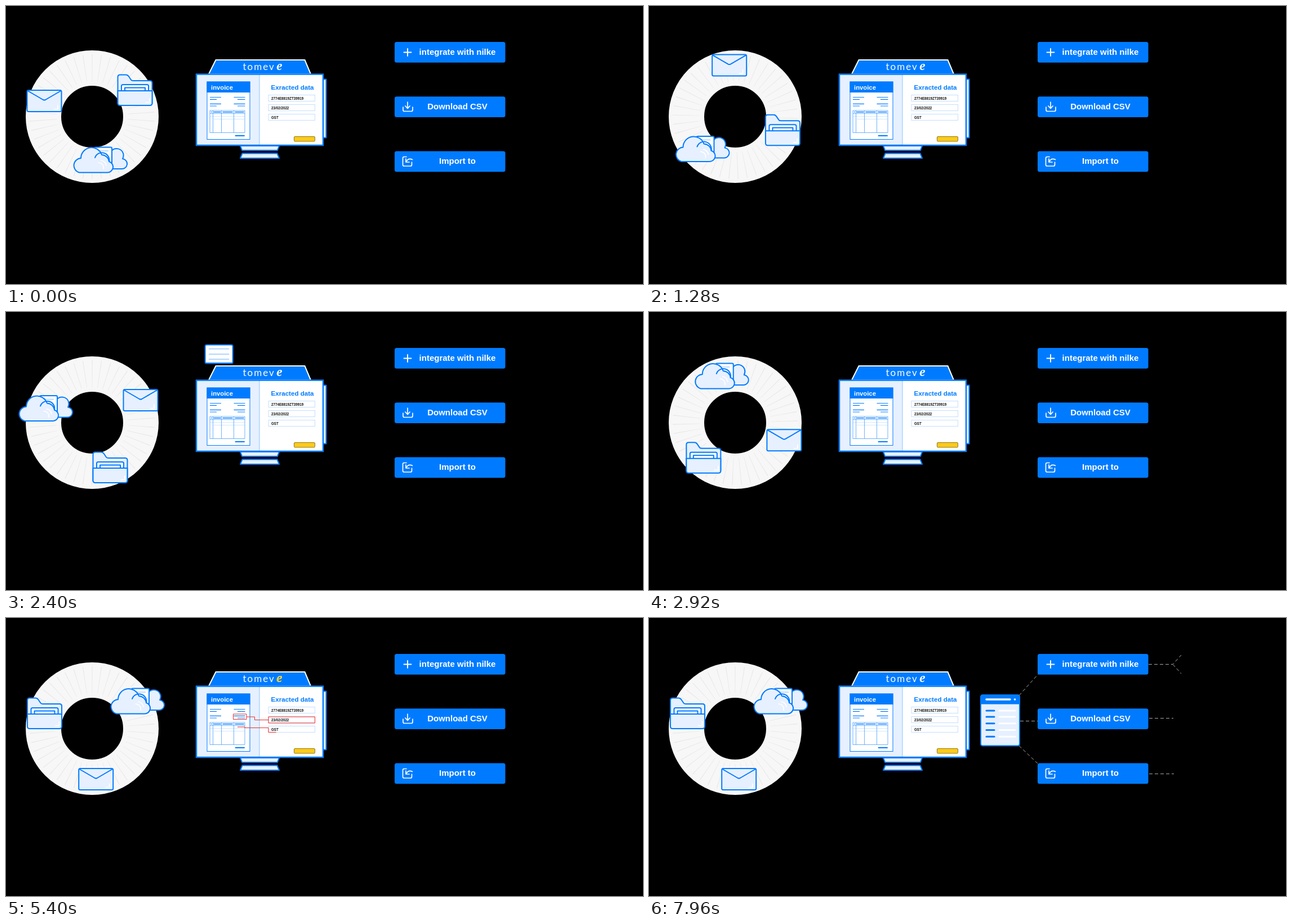
Write an HTML page that moves like this. It is 1131 px wide and 495 px high and loops after 8 s.

```html
<!DOCTYPE html>
<html lang="en">
<head>
<meta charset="utf-8">
<title>Invoice flow</title>
<style>
html, body { margin: 0; width: 100%; height: 100%; overflow: hidden; background: #000; }
svg { display: block; width: 1131px; height: 495px; }
text { font-family: "Liberation Sans", Arial, sans-serif; font-weight: 700; }
.b { stroke: #007bff; stroke-width: 2; stroke-linejoin: round; stroke-linecap: round; }
.pale { fill: #e6f0ff; }
.white { fill: #fff; }
.blue { fill: #007bff; }
.none { fill: none; }
.soft { stroke: #a6d0ff; fill: none; }
.w { stroke: #fff; fill: none; stroke-width: 1.7; stroke-linecap: round; stroke-linejoin: round; }
.label { fill: #fff; font-size: 15px; text-anchor: middle; }
.val { font-size: 6.28px; fill: #111; }
.dash { stroke: #a8a8a8; fill: none; stroke-dasharray: 6 4; }
.trace { stroke: #ee2b2b; fill: none; }
.mark { font: italic 700 19px "Noto Serif", serif; }
</style>
</head>
<body>
<svg viewBox="0 0 1131 495">
  <defs>
    <clipPath id="clipA"><rect id="wipeA" x="650" y="90" width="0" height="180"/></clipPath>
    <clipPath id="clipB"><rect id="wipeB" x="886" y="50" width="0" height="240"/></clipPath>
  </defs>

  <g id="card">
    <rect class="b white" x="-24.5" y="-16.5" width="49" height="33" rx="2.5"/>
    <path class="b" d="M-23 16H23"/>
    <path class="soft" stroke-width="1.6" d="M-18-9.5H18M-18 0H18M-18 9H18"/>
  </g>

  <circle cx="153" cy="197" r="86.5" fill="none" stroke="#f7f7f7" stroke-width="63"/>
  <circle id="ticks" cx="153" cy="197" r="87" fill="none" stroke="#e7e7e7" stroke-width="48" pathLength="420" stroke-dasharray=".7 9.3"/>

  <g id="cloud">
    <path class="b pale" d="M20 16H39A9 9 0 0 0 41-2A12 12 0 0 0 20-14Z"/>
    <rect class="b white" x="-9" y="-22.5" width="31" height="38" rx="2"/>
    <path class="soft" stroke-width="1.5" d="M-2-16H16"/>
    <path class="b pale" d="M-36 22.5A13 13 0 0 1-33-3A19 19 0 0 1 4-9A13.5 13.5 0 0 1 17 3A10 10 0 0 1 13 22.5Z"/>
    <path class="b none" d="M-8-4A13 13 0 0 1 17 3"/>
    <path class="w" d="M-2 5A9 9 0 0 1 7 16M3 1A11 11 0 0 1 12 10"/>
  </g>
  <g id="folder">
    <path class="b pale" d="M-30.5 24V-23Q-30.5-27-26.5-27H-16Q-13-27-11-24L-7-18Q-6-16.5-3-16.5H26.5Q30.5-16.5 30.5-12.5V24Z"/>
    <path class="b white" d="M-24 1V-7Q-24-9.5-21.5-9.5H21.5Q24-9.5 24-7V1"/>
    <path class="b none" stroke-width="1.5" d="M-18 1V-4H18V1"/>
    <path class="b pale" d="M-30.5 1.5H30.5V23.5Q30.5 27.5 26.5 27.5H-26.5Q-30.5 27.5-30.5 23.5Z"/>
    <path class="w" d="M26 15V22H19"/>
  </g>
  <g id="mail">
    <rect class="b pale" x="-30.5" y="-19" width="61" height="38" rx="2.5"/>
    <path class="b none" d="M-29.5-18L-2-2Q0-1 2-2L29.5-18"/>
    <path class="w" d="M24 8V14.5H17.5"/>
  </g>

  <g id="sheet">
    <rect class="b pale" stroke-width="2.5" x="1" y="137" width="69" height="90.5" rx="3.5"/>
    <path class="blue" d="M1 153.500V141Q1 137 5 137H66Q70 137 70 141V153.500Z"/>
    <path class="w" style="stroke-width:3.500px" d="M11 145H53"/>
    <circle class="white" cx="61.500" cy="145" r="1.800"/>
    <g id="rows"></g>
  </g>

  <rect class="b pale" x="555" y="130.500" width="13.500" height="104" />
  <path class="b pale" d="M416 249H485L482 257H419Z"/>
  <path class="b pale" d="M419.500 262.500H481.500L485 271H416Z"/>
  <path class="blue" stroke="#fff" stroke-width="2" d="M372.500 96H530.500L541 121H360Z"/>
  <rect class="white" x="338" y="121.500" width="225" height="126.500"/>
  <rect class="pale" x="338" y="121.500" width="112" height="126.500"/>
  <path stroke="#8fc4ff" d="M450 122V248"/>
  <rect class="b none" style="stroke-width:2.500px;stroke-linejoin:miter" x="338" y="121.500" width="225" height="126.500"/>
  <text x="420.500" y="114" fill="#fff" style="font:400 17px Lato,sans-serif;letter-spacing:2px">tomev</text>
  <text class="mark" x="480" y="114" fill="#fff">e</text>
  <text class="mark" id="glow" x="480" y="114" fill="#ffcf1a">e</text>

  <rect class="white" x="357" y="135" width="76" height="102.500" stroke="#007bff"/>
  <rect class="blue" x="356.500" y="134.500" width="77" height="19.500"/>
  <text x="364" y="149" fill="#fff" font-size="11.300">invoice</text>
  <path stroke="#007bff" stroke-width="1.200" d="M362 162.500H382M362 166.300H374M404.500 162.500H424.500M411 166.300H424.500M362 174.300H382M362 178H374M404.500 174.300H424.500M411 178H424.500"/>
  <path class="soft" stroke-width=".7" opacity=".7" d="M362 196.500H424M369 201.500H423"/>
  <path stroke="#4aa0ff" stroke-width=".8" fill="none" d="M362 186H424V225.500H362ZM362 191.500H424M367.500 186V225.500M382.500 186V225.500M404.500 186V225.500"/>
  <path class="b" style="stroke-width:1.500px" d="M364.500 188.800H365M369 188.800H381M385 188.800H402M407 188.800H422"/>
  <path class="b" d="M407.500 231H423"/>

  <text class="blue" x="470.500" y="149" font-size="11.600">Exracted data</text>
  <g id="fields"></g>
  <rect x="511.500" y="232.500" width="37" height="8.500" rx="1.500" fill="#ffcb12" stroke="#8a7430"/>
  <g id="traces"></g>

  <path class="dash" clip-path="url(#clipA)" d="M657 138L691 100M659 183.500H690M657 227.500L690 259"/>
  <path class="dash" clip-path="url(#clipB)" d="M887 82.500H930L945 66M930 82.500L945 99M888 178.500H931M888 277.500H932"/>

  <g id="buttons"></g>
  <path class="w" style="stroke-width:2px" d="M706.500 82.500H719.500M713 76V89"/>
  <path class="w" d="M713 171V182M709 178L713 182.500L717 178M705 180V185Q705 187.500 707.500 187.500H719.500Q722 187.500 722 185V180"/>
  <path class="w" d="M711 268.500H707Q704.500 268.500 704.500 271V282.500Q704.500 285 707 285H718Q720.500 285 720.500 282.500V278M710 272V278H716M710.500 277.500Q714 270 721.500 273.500"/>
  <g id="labels"></g>
</svg>
<script>
const $ = id => document.getElementById(id);
const clamp = v => Math.max(0, Math.min(1, v));
const span = (t, a, b) => clamp((t - a) / (b - a));
const place = (id, x, y) => $(id).setAttribute('transform', `translate(${x.toFixed(2)} ${y.toFixed(2)})`);

$('rows').innerHTML = [165, 176, 187.700, 199.500, 211.200].map(y =>
  `<path class="b" style="stroke-width:3px" d="M11 ${y}H25"/><path class="w" style="stroke-width:3px" d="M34 ${y}H62"/>`).join('');
$('fields').innerHTML = ['2774E8819ZT39919', '23/02/2022', 'GST'].map((s, i) => {
  const y = 158.500 + 17 * i;
  return `<rect class="white" x="466" y="${y}" width="82.500" height="11" stroke="#c4dfff"/><text class="val" x="471" y="${y + 8}">${s}</text>`;
}).join('');
['integrate with nilke', 'Download CSV', 'Import to'].forEach((s, i) => {
  const y = 64 + 97.200 * i;
  $('buttons').innerHTML += `<rect class="blue" x="690" y="${y}" width="196.500" height="36.800" rx="3.500"/>`;
  $('labels').innerHTML += `<text class="label" x="801.500" y="${y + 22.500}">${s}</text>`;
});
$('traces').innerHTML = [
  'M427 164V160H400.500V169H427V164H466V169.500H548.500V158.500H466V164',
  'M427 176V171H403.500V180.500H427V176H441.500V181.500H466V187H548.500V176H466V181.500',
  'M411 194H424V195.500H466V203.500H548.500V192.500H466V195.500'
].map(d => `<path class="trace" pathLength="1" d="${d}"/>`).join('');
const traces = [...$('traces').children];

// Icon centres at each stop of the wheel, travelled clockwise in polar form
const C = [153, 197];
const stops = {
  folder: [[229, 149.500], [185, 276.500], [97, 259.500], [68.500, 169.500]],
  mail: [[68, 169], [239, 157], [240, 228], [159.700, 287]],
  cloud: [[166, 274], [69, 171.500], [127.500, 114], [232, 148]]
};
const polar = {};
for (const id in stops) {
  let last = -9;
  polar[id] = stops[id].map(([x, y]) => {
    let a = Math.atan2(y - C[1], x - C[0]);
    while (a < last) a += 2 * Math.PI;
    last = a;
    return [a, Math.hypot(x - C[0], y - C[1])];
  });
}
const turns = [0, 120, 174, 240];
const mix = (list, w) => {
  const i = Math.min(2, Math.floor(w));
  return list[i] + (list[i + 1] - list[i]) * (w - i);
};

// start, duration, height of the peak, drop after it
const flights = [[40, 880, 65.500, 36], [1755, 880, 65.500, 36], [3340, 560, 79.500, 64]];

function drawCard(t) {
  const f = flights.find(([s, d]) => t >= s && t <= s + d);
  $('card').style.display = f ? '' : 'none';
  if (!f) return;
  const [s, d, top, drop] = f, u = (t - s) / d, peak = .45;
  const y = u < peak
    ? top + (143 - top) * (1 + Math.cos(Math.PI * u / peak)) / 2
    : top + drop * ((u - peak) / (1 - peak)) ** 2;
  place('card', 235 + 195 * u, y);
}

function draw(t) {
  const w = span(t, 880, 1720) + span(t, 2560, 2920) + span(t, 2920, 3360);
  for (const id in polar) {
    const a = mix(polar[id].map(p => p[0]), w), r = mix(polar[id].map(p => p[1]), w);
    place(id, C[0] + r * Math.cos(a), C[1] + r * Math.sin(a));
  }
  $('ticks').setAttribute('transform', `rotate(${mix(turns, w) - 90.300} 153 197)`);
  drawCard(t);

  traces.forEach((p, i) => {
    const age = t - 4040 - 560 * i;
    const end = span(age, 0, 750), start = span(age, 900, 1200);
    p.style.display = end > start ? '' : 'none';
    p.setAttribute('stroke-dasharray', `0 ${start} ${end - start} 2`);
  });
  $('glow').setAttribute('opacity', t > 4040 && t < 6216 ? Math.sin(Math.PI * (t - 4040) / 544) ** 2 : 0);

  $('sheet').style.display = t < 6040 ? 'none' : '';
  place('sheet', 490 + 98 * span(t, 6040, 6600), 0);
  $('wipeA').setAttribute('width', 42 * span(t, 6560, 7000));
  $('wipeB').setAttribute('width', 60 * span(t, 7560, 7960));
}

function tick() {
  draw(performance.now() % 8000);
  requestAnimationFrame(tick);
}
tick();
</script>
</body>
</html>
```
